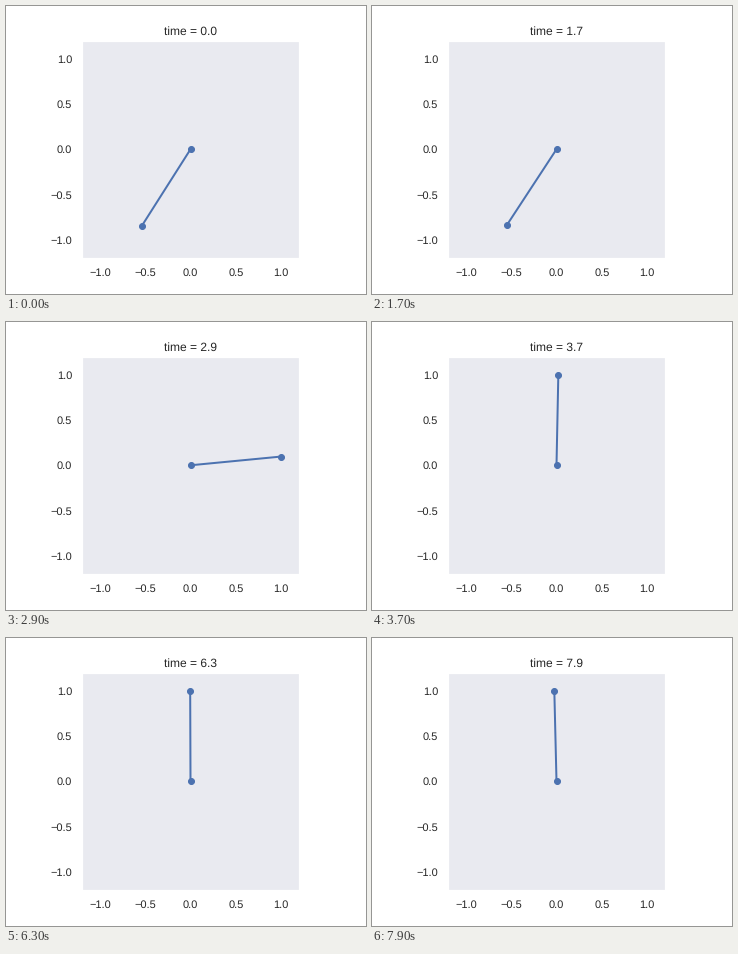
A matplotlib script that plays this animation: 360 by 288 pixels, repeating every 8 s.

```python
import numpy as np
import matplotlib.pyplot as plt
from matplotlib.animation import FuncAnimation

FRAMES, STEP_MS = 80, 100
INK, PANEL, BLUE = "#262626", "#E9EAF0", "#4C72B0"

# Turning points of the swing: (seconds, degrees from hanging straight down)
TURNS = [(-0.6, -11.2), (0.25, -37.7), (1.1, 54.4), (2.14, -87.0)]
REST = 180.85

plt.rcParams.update({
    "font.family": "Liberation Sans",
    "text.hinting": "none",
    "text.color": INK,
    "axes.facecolor": PANEL,
    "axes.edgecolor": "white",
    "axes.linewidth": 1.25,
    "axes.titlesize": 12,
    "xtick.labelsize": 11, "ytick.labelsize": 11,
    "xtick.color": INK, "ytick.color": INK,
    "xtick.major.size": 6, "ytick.major.size": 6,
    "xtick.bottom": False, "ytick.left": False,
})


def swing(t):
    """Ease between turning points, like a pendulum."""
    for (t0, a0), (t1, a1) in zip(TURNS, TURNS[1:]):
        if t <= t1:
            return a0 + (a1 - a0) * (1 - np.cos(np.pi * (t - t0) / (t1 - t0))) / 2


def climb(t):
    """Rise from the last turning point and settle upright with a wobble."""
    start, low = TURNS[-1]
    wobble = 0.65 * np.clip(t - 3.4, 0, 1) * np.cos(2 * np.pi * (t - 6.3))
    return REST - (REST - low) * np.exp(-1.98 * (t - start) ** 2) - wobble


def angle(t):
    return np.radians(swing(t) if t < TURNS[-1][0] else climb(t))


fig, ax = plt.subplots(figsize=(5, 4), dpi=72, facecolor="white")
fig.subplots_adjust(left=0.125, right=0.9, bottom=0.125, top=0.88)
ticks = np.arange(-1, 1.1, 0.5)
ax.set(xlim=(-1.2, 1.2), ylim=(-1.2, 1.2), aspect="equal",
       xticks=ticks, yticks=ticks)
rod, = ax.plot([], [], "o-", color=BLUE, lw=2, ms=6)
title = ax.set_title("")


def draw(i):
    t = i * STEP_MS / 1000
    a = angle(t)
    rod.set_data([0, np.sin(a)], [0, -np.cos(a)])
    title.set_text(f"time = {t:.1f}")
    return rod, title


anim = FuncAnimation(fig, draw, frames=FRAMES, interval=STEP_MS,
                     repeat=True, repeat_delay=0, blit=False)
plt.show()
```
